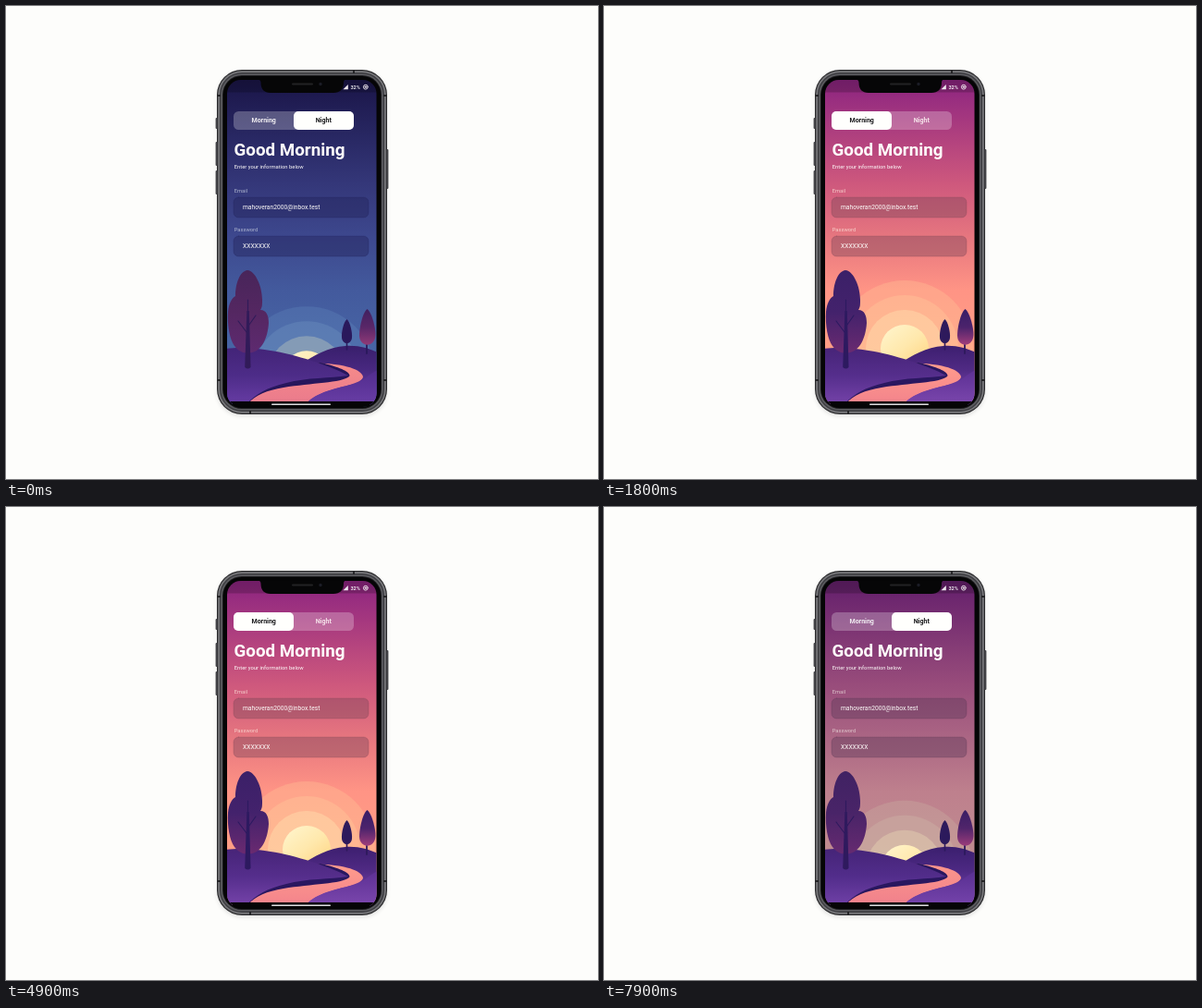
Write an HTML page with a canvas that moves like this. It is 640x512 px and loops after 8000 ms.

```html
<!DOCTYPE html>
<html lang="en">
<head>
<meta charset="utf-8">
<title>Day and night sign-in</title>
<style>
  html, body { margin: 0; width: 100%; height: 100%; overflow: hidden; background: #fdfdfb; }
  canvas { display: block; width: 640px; height: 512px; }
</style>
</head>
<body>
<canvas id="stage"></canvas>
<script>
const LOOP = 8000;
const canvas = document.getElementById('stage');
const ctx = canvas.getContext('2d');
const dpr = window.devicePixelRatio || 1;
canvas.width = 640 * dpr;
canvas.height = 512 * dpr;

// Each track is a list of [time, value] pairs.
const tracks = {
  night: [[0, .88], [100, .93], [200, .97], [400, 1], [950, 1], [1000, .5], [1100, .12],
          [1300, 0], [7700, 0], [7800, .08], [7900, .3], [8000, .88]],
  sunset: [[0, .88], [100, .94], [300, 1], [950, 1], [1000, .75], [1100, .45],
           [1300, .05], [1500, 0], [7700, 0], [7800, .3], [7900, .65], [8000, .88]],
  tab: [[0, 1], [950, 1], [1030, 0], [7740, 0], [7830, 1], [8000, 1]]
};

// Position, day colour, night colour.
const sky = [
  [0, '#8c2480', '#0a1340'],
  [.33, '#ce587d', '#1f3278'],
  [.5, '#e6767f', '#264290'],
  [.67, '#ff9485', '#2a52a0'],
  [1, '#ffa684', '#3265b0']
];

let night = 0;

function valueAt(track, t) {
  for (let i = 1; i < track.length; i++) {
    const [t0, a] = track[i - 1], [t1, b] = track[i];
    if (t <= t1) return a + (b - a) * (t - t0) / (t1 - t0);
  }
  return track[track.length - 1][1];
}

function channels(hex) {
  return [1, 3, 5].map(i => parseInt(hex.slice(i, i + 2), 16));
}

// Colour between its day and night values.
function tone(day, dark, alpha = 1) {
  const d = channels(day), n = channels(dark);
  const c = d.map((v, i) => Math.round(v + (n[i] - v) * night));
  return `rgba(${c.join(',')},${alpha})`;
}

function vertical(y0, y1, ...colors) {
  const g = ctx.createLinearGradient(0, y0, 0, y1);
  colors.forEach((c, i) => g.addColorStop(i / (colors.length - 1), c));
  return g;
}

function box(x, y, w, h, r, fill) {
  ctx.beginPath();
  ctx.roundRect(x, y, w, h, r);
  ctx.fillStyle = fill;
  ctx.fill();
}

function shape(path, fill) {
  ctx.fillStyle = fill;
  ctx.fill(new Path2D(path));
}

function disc(x, y, r, fill) {
  ctx.beginPath();
  ctx.arc(x, y, r, 0, Math.PI * 2);
  ctx.fillStyle = fill;
  ctx.fill();
}

function line(path, color, width) {
  ctx.strokeStyle = color;
  ctx.lineWidth = width;
  ctx.lineCap = 'round';
  ctx.stroke(new Path2D(path));
}

function label(text, x, y, size, weight, color, align = 'left') {
  ctx.font = `${weight} ${size}px Roboto, "Liberation Sans", sans-serif`;
  ctx.textAlign = align;
  ctx.fillStyle = color;
  ctx.fillText(text, x, y);
}

function drawBody() {
  ctx.save();
  ctx.shadowColor = 'rgba(60,60,70,.15)';
  ctx.shadowBlur = 4 * dpr;
  ctx.shadowOffsetY = 2 * dpr;
  box(228, 69, 184, 373, 27, '#2a2a2c');
  ctx.restore();
  for (const [y, h] of [[121, 12], [147, 26], [178, 26]]) box(226.6, y, 2, h, 1, '#46464a');
  box(411.4, 155, 2, 43, 1, '#46464a');
  const rims = [[1.2, '#77777a'], [3, '#3c3c40'], [4.4, '#5c5c60'], [6, '#19191b'], [7, '#050506']];
  for (const [d, c] of rims) box(228 + d, 69 + d, 184 - 2 * d, 373 - 2 * d, 27 - d, c);
  ctx.fillStyle = '#242426';
  for (const [x, y, w, h] of [[228, 96, 4, 2], [408, 96, 4, 2], [228, 404, 4, 2],
    [408, 404, 4, 2], [375, 69, 2, 4], [263, 438, 2, 4]]) ctx.fillRect(x, y, w, h);
}

function drawSky() {
  const g = ctx.createLinearGradient(0, 80, 0, 420);
  for (const [p, day, dark] of sky) g.addColorStop(p, tone(day, dark));
  ctx.fillStyle = g;
  ctx.fillRect(238, 79, 164, 352);
}

function drawSun(drop) {
  const x = 325, y = 371 + 32 * drop;
  disc(x, y, 74, tone('#ffc494', '#4a7cc0', .35));
  disc(x, y, 58, tone('#ffcb9c', '#5c8cc4', .35));
  disc(x, y, 42, tone('#ffdcac', '#a3b4bc', .5));
  const g = ctx.createLinearGradient(x - 14, y - 26, x + 16, y + 14);
  g.addColorStop(0, '#fff3c8');
  g.addColorStop(.55, '#ffe8ac');
  g.addColorStop(1, '#ffd98c');
  disc(x, y, 26, g);
}

function drawTrees() {
  const dark = tone('#2e1a5c', '#29195c');
  line('M368.5 358V372', dark, 1.6);
  shape('M368.5 339C372 342 374.5 353 374 359C373 367 364 367 363 359C362.5 353 365 342 368.5 339Z', dark);
  line('M390 362V376', dark, 1.8);
  shape('M390.5 328C395 331 399.5 347 399.5 356C399 370 382.5 370 382 357C382 347 386 331 390.5 328Z',
    vertical(328, 368, tone('#361d66', '#41205f'), tone('#4c236c', '#5c2868'), tone('#a63f7c', '#903a78')));
}

function drawBigTree() {
  const fill = vertical(286, 376, tone('#3b2068', '#4a2658'), tone('#43226c', '#562860'), tone('#6a2a70', '#5c2a70'));
  const trunk = tone('#2d1a60', '#321b58');
  shape('M261 286C270 287 277 304 277 318C277 324 277 326 275 329C282 329 284 336 284 343' +
    'C283 360 276 373 266 375C260 377 252 375 247 368C242 361 239 346 240 331' +
    'C241 322 244 316 248 314C248 300 253 287 261 286Z', fill);
  line('M261.5 318V360M261.5 347L270 335M261.5 355L251 341', trunk, 1.2);
  shape('M260.4 330L262.8 330L264.5 391Q261.5 394 258.2 391Z', trunk);
}

function drawLand() {
  shape('M318 388C334 378 348 369 367 368C382 367 392 371 402 375V432H300Z',
    vertical(368, 420, tone('#3d1f70', '#381f6c'), tone('#502a84', '#472880'), tone('#7644a8', '#633aa0')));
  drawTrees();
  shape('M330 387C355 386 383 391 386 401C386 409 360 412 344 418C334 422 328 426 324 431H258' +
    'C266 418 288 411 316 408Z', vertical(386, 428, tone('#ff9c8c', '#f58a8a'), tone('#f4858c', '#ea7a8c')));
  shape('M402 394C393 398 389 404 377 409C360 413 334 418 323 432H402Z',
    vertical(394, 430, tone('#5c3094', '#4f2c8c'), tone('#7a46ac', '#663ca4')));
  shape('M340 386C362 391 374 397 371 401C363 408 330 408 300 413C282 416 270 421 262 430H238V400Z',
    tone('#2a1760', '#27165c'));
  shape('M238 371C250 369 270 370 286 373C312 377 350 389 370 400C350 403 325 402 303 408' +
    'C282 413 270 420 260 431H238Z',
    vertical(370, 430, tone('#472478', '#422478'), tone('#552e8c', '#4c2c88'), tone('#7442a8', '#643aa2')));
  drawBigTree();
}

function drawForm(tab) {
  const white = '#fffdfb';
  const ink = '#171719';
  box(246, 114, 130, 20, 5.5, 'rgba(255,255,255,.25)');
  box(246 + 65 * tab, 114, 65, 20, 5, '#fffffd');
  label('Morning', 278.7, 126.3, 7, 700, tab < .5 ? ink : '#f1eef2', 'center');
  label('Night', 343.2, 126.3, 7, 700, tab < .5 ? '#f6e4ea' : ink, 'center');

  label('Good Morning', 246.5, 161.8, 18.8, 700, white);
  label('Enter your information below', 246.7, 175.6, 5.85, 400, white);

  const rows = [['Email', 'mahoveran2000@inbox.test', 207], ['Password', 'XXXXXXX', 249]];
  for (const [name, value, y] of rows) {
    label(name, 246.7, y - 4.8, 5.8, 400, tone('#fbdcd4', '#b4c0d8', .9));
    box(246, y, 146, 22, 5.5, tone('#7c4658', '#171d58', .42));
    ctx.strokeStyle = tone('#7c4254', '#171d58', .35);
    ctx.lineWidth = .8;
    ctx.stroke();
    label(value, 256, y + 13.4, 6.7, 400, white);
  }
}

function drawTopBar() {
  ctx.fillStyle = 'rgba(0,0,0,.2)';
  ctx.fillRect(238, 79, 164, 14.5);
  shape('M271 78V79C274 79 275.5 81 275.5 83C275.5 90 279 94 286 94H354C361 94 365 90 365 83' +
    'C365 81 366 79 369 79V78Z', '#060607');
  box(309, 83.4, 23, 2.2, 1.1, '#222224');
  disc(340, 84.5, 1.7, '#1b1c26');
  shape('M364.5 90.2H369.8V84.9Z', '#eee7ee');
  label('32%', 372.4, 90, 5.6, 500, '#fff');
  ctx.beginPath();
  ctx.arc(388.8, 87.7, 2.4, 0, Math.PI * 2);
  ctx.strokeStyle = '#f4eef2';
  ctx.lineWidth = .9;
  ctx.stroke();
  box(387.8, 86.8, 2, 1.8, .4, '#f4eef2');
}

function draw(t) {
  night = valueAt(tracks.night, t);
  ctx.setTransform(dpr, 0, 0, dpr, 0, 0);
  ctx.fillStyle = '#fdfdfb';
  ctx.fillRect(0, 0, 640, 512);
  drawBody();

  ctx.save();
  ctx.beginPath();
  ctx.roundRect(239, 80, 161.5, 354, 15);
  ctx.clip();
  drawSky();
  drawSun(valueAt(tracks.sunset, t));
  drawLand();
  drawForm(valueAt(tracks.tab, t));
  drawTopBar();
  ctx.fillStyle = '#050506';
  ctx.fillRect(238, 428, 164, 8);
  ctx.restore();
  box(287, 430.6, 64, 1.4, .7, '#dededf');
}

const start = performance.now();
function tick() {
  draw((performance.now() - start) % LOOP);
  requestAnimationFrame(tick);
}
tick();
</script>
</body>
</html>
```
